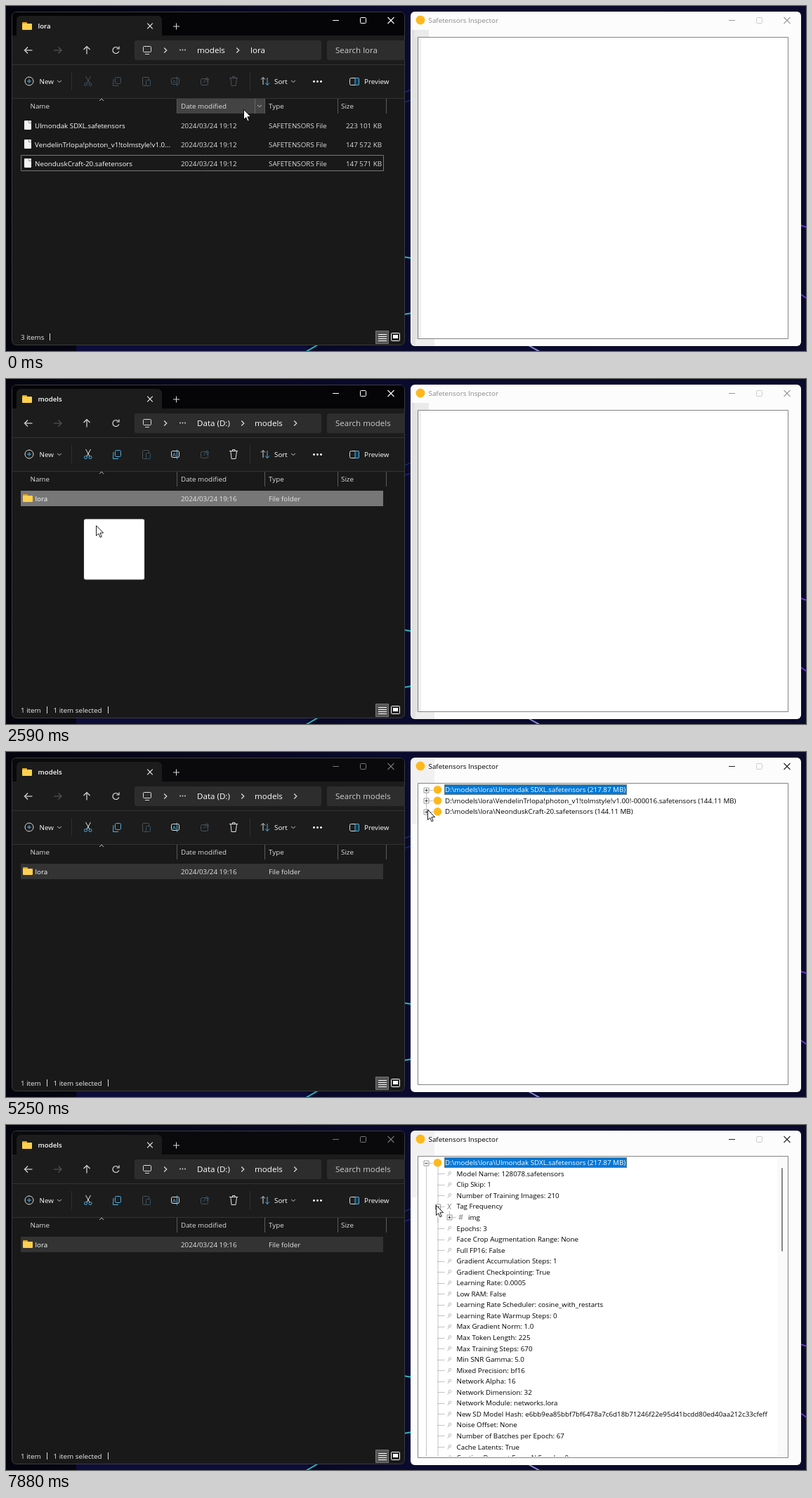
Recreate the animation shown at these times as an HTML page with a canvas. Size 1139x491 px, loop 8 s.

```html
<!DOCTYPE html>
<html lang="en">
<head>
<meta charset="utf-8">
<title>Safetensors Inspector</title>
<style>
html, body { margin: 0; height: 100%; overflow: hidden; background: #05050f; }
canvas { display: block; }
</style>
</head>
<body>
<canvas id="stage" width="1139" height="491"></canvas>
<script>
const g = document.getElementById('stage').getContext('2d');
const LOOP = 8000, ROW = 15.55, BLUE = '#4cb4e8', DIM = '#4b5258', YELLOW = '#ffb81c';

const files = [
  ['Ulmondak SDXL.safetensors', '223 101 KB', '217.87 MB'],
  ['VendelinTrlopa!photon_v1!tolmstyle!v1.00!-000016.safetensors', '147 572 KB', '144.11 MB'],
  ['NeonduskCraft-20.safetensors', '147 571 KB', '144.11 MB']
];

// label | value of the first file | value of the third file
const meta = `Model Name|128078.safetensors|sd-v1-5-pruned-noema-fp16.safetensors
Clip Skip|1|2
Number of Training Images|210|336
Tag Frequency
Epochs|3|20
Face Crop Augmentation Range|None|None
Full FP16|False|False
Gradient Accumulation Steps|1|1
Gradient Checkpointing|True|False
Learning Rate|0.0005|0.0001
Low RAM|False|True
Learning Rate Scheduler|cosine_with_restarts|cosine_with_restarts
Learning Rate Warmup Steps|0|168
Max Gradient Norm|1.0|1.0
Max Token Length|225|225
Max Training Steps|670|3360
Min SNR Gamma|5.0|5.0
Mixed Precision|bf16|fp16
Network Alpha|16|128
Network Dimension|32|128
Network Module|networks.lora|networks.lora
New SD Model Hash|e6bb9ea85bbf7bf6478a7c6d18b71246f22e95d41bcdd80ed40aa212c33cfeff|f8999e07ed43938dfcfc71498a761c79472999547b045100d201e376715cecfe
Noise Offset|None|None
Number of Batches per Epoch|67|168
Cache Latents|True|True
Caption Dropout Every N Epochs|0|0
Caption Dropout Rate|0.0|0.0`.split('\n').map(s => s.split('|'));

// pointer stops: time, x, y
const path = [
  [0, 338, 147], [590, 338, 147], [1300, 280, 70], [1410, 280, 70],
  [2200, 55, 169], [2450, 55, 169], [2590, 127, 208], [2740, 362, 290],
  [2800, 470, 297], [2860, 567, 285], [2950, 655, 235], [3090, 703, 197],
  [4390, 703, 197], [5130, 600, 82], [5430, 600, 82], [5690, 638, 116],
  [5800, 638, 116], [6040, 725, 166], [6250, 725, 166], [6520, 586, 58],
  [6690, 598, 52], [6880, 598, 52], [7220, 631, 119], [7450, 631, 119],
  [7630, 612, 114], [8000, 612, 114]
];

const same = (a, b) => a[1] === b[1] && a[2] === b[2];

function slope(i, k) {
  const a = path[i - 1], b = path[i], c = path[i + 1];
  return !a || !c || same(a, b) || same(b, c) ? 0 : (c[k] - a[k]) / (c[0] - a[0]);
}

function pointer(t) {
  let i = 0;
  while (i < path.length - 2 && path[i + 1][0] <= t) i++;
  const a = path[i], b = path[i + 1], d = b[0] - a[0], u = (t - a[0]) / d;
  return [1, 2].map(k =>
    a[k] + (b[k] - a[k]) * u * u * (3 - 2 * u) +
    d * u * (1 - u) * ((1 - u) * slope(i, k) - u * slope(i + 1, k)));
}

function box(x, y, w, h, color, r = 0, border) {
  g.beginPath();
  g.roundRect(x, y, w, h, r);
  if (color) { g.fillStyle = color; g.fill(); }
  if (border) { g.strokeStyle = border; g.lineWidth = 1; g.stroke(); }
}

function line(color, width, ...p) {
  g.beginPath();
  for (let i = 0; i < p.length; i += 2) g.lineTo(p[i], p[i + 1]);
  g.strokeStyle = color;
  g.lineWidth = width;
  g.stroke();
}

function dot(x, y, r, color, outline) {
  g.beginPath();
  g.arc(x, y, r, 0, 7);
  if (outline) { g.strokeStyle = color; g.lineWidth = outline; g.stroke(); }
  else { g.fillStyle = color; g.fill(); }
}

function text(s, x, y, color = '#fff', size = 9.8, weight = 400, align = 'left') {
  g.font = `${weight} ${size}px "Open Sans", "Noto Sans", sans-serif`;
  g.textAlign = align;
  g.fillStyle = color;
  g.fillText(s, x, Math.round(y + size * .36));
}

const cross = (x, y, r, c) => {
  line(c, 1.1, x - r, y - r, x + r, y + r);
  line(c, 1.1, x - r, y + r, x + r, y - r);
};
const plus = (x, y, r, c) => {
  line(c, 1, x - r, y, x + r, y);
  line(c, 1, x, y - r, x, y + r);
};
const chevron = (x, y, c = '#ddd') => line(c, 1.2, x - 1.8, y - 3.5, x + 1.8, y, x - 1.8, y + 3.5);
const caret = (x, y, h, c = '#bbb') => line(c, 1, x - 3, y, x, y + h, x + 3, y);

function folder(x, y) {
  box(x, y, 7, 5, '#e8a417', 1);
  box(x, y + 2, 14, 9, '#ffd04f', 1);
}

function controls(x, color, mid) {
  line(color, 1, x - 4, 20.5, x + 5, 20.5);
  box(x + 35.5, 16.5, 8, 8, null, 1, mid);
  cross(x + 79, 20.5, 4.5, color);
}

function desktop() {
  const bg = g.createLinearGradient(0, 0, 1139, 0);
  bg.addColorStop(0, '#04040e');
  bg.addColorStop(.5, '#0a0a2e');
  bg.addColorStop(1, '#0a0a2a');
  g.fillStyle = bg;
  g.fillRect(0, 0, 1139, 491);
  box(100, 482, 330, 9, '#0d0d3a');
  line('#1b3f9c', 1, 567, 123, 577, 119);
  line('#1b3f9c', 1, 567, 137, 577, 134);
  line('#2bb5bd', 2, 566, 357, 578, 359);
  line('#2bb5bd', 2, 566, 439, 578, 437);
  line('#2bb5bd', 2, 427, 492, 446, 481);
  line('#8d8de0', 2, 742, 482, 760, 492);
  line('#6a35d8', 2, 1131, 312, 1140, 315);
  line('#6a35d8', 2, 1131, 410, 1140, 416);
}

function toolbar(on) {
  const w = on ? '#e4e4e4' : DIM, b = on ? BLUE : '#35556a';
  dot(33, 107, 6, '#ddd', 1);
  plus(33, 107, 3, BLUE);
  text('New', 47.5, 107.5);
  caret(76, 106, 2.5);
  line('#303030', 1, 93.5, 94, 93.5, 120);

  line(w, 1, 113.5, 100, 119, 110);
  line(w, 1, 120.5, 100, 115, 110);
  dot(113.5, 111.5, 2, b, 1);
  dot(120, 111.5, 2, b, 1);
  box(155.5, 101.5, 8, 9, null, 2, b);
  line(b, 1, 153, 104, 152.5, 113.5, 160, 113.5);
  box(194.5, 101.5, 9, 12, null, 1, DIM);
  box(199.5, 105.5, 6, 8, '#1c1c1c', 1, '#35556a');
  box(235.5, 102.5, 11, 9, null, 2, w);
  line(b, 1, 243.5, 100.5, 243.5, 114);
  text('A', 237, 107, b, 8);
  box(277.5, 103.5, 10, 9, null, 2, DIM);
  line('#35556a', 1, 281, 109, 284, 104.5, 288, 104.5);
  line('#35556a', 1, 285, 101, 289, 104.5, 285, 108);
  line(w, 1, 318, 102.5, 330, 102.5);
  line(w, 1, 320, 103, 321, 113.5, 327, 113.5, 328.5, 103);
  line(w, 1, 322.5, 102, 322.5, 100.5, 326, 100.5, 326, 102);
  line('#303030', 1, 347.5, 94, 347.5, 120);

  line('#ddd', 1, 363, 104.5, 366, 101.5, 369, 104.5);
  line('#ddd', 1, 366, 102, 366, 112);
  line(BLUE, 1, 372, 102, 372, 112.5);
  line(BLUE, 1, 369, 109.5, 372, 112.5, 375, 109.5);
  text('Sort', 382, 107.5);
  caret(409, 106, 2.5);
  for (const x of [438.5, 443.5, 448.5]) dot(x, 107.5, 1.4, '#fff');
  box(489.5, 102.5, 13, 10, null, 2, '#ddd');
  box(497, 102.5, 5.5, 10, '#16384a', 1, BLUE);
  text('Preview', 510, 107.5);
}

function addressBar(up, chip) {
  box(183, 49, 266, 28, '#2d2d2d', 3);
  box(457, 49, 111, 28, '#2d2d2d', [3, 0, 0, 3]);
  if (chip) box(265, 53, 75, 20, '#383838', 2);
  line('#ddd', 1.2, 37.5, 63, 27, 63);
  line('#ddd', 1.2, 31, 58.5, 26.5, 63, 31, 67.5);
  line('#555', 1.2, 68, 63, 78.5, 63);
  line('#555', 1.2, 74.5, 58.5, 79, 63, 74.5, 67.5);
  line('#ddd', 1.2, 115, 58, 115, 68.5);
  line('#ddd', 1.2, 110.5, 62, 115, 57.5, 119.5, 62);
  g.beginPath();
  g.arc(156.5, 63, 4.5, .3, 5.6);
  g.strokeStyle = '#ddd';
  g.stroke();
  line('#ddd', 1.2, 161, 57.5, 161, 61, 157.5, 61);
  box(195.5, 57.5, 11, 8, null, 1, '#ddd');
  line('#ddd', 1, 198, 68.5, 204, 68.5);
  chevron(227, 63);
  for (const x of [248, 251.5, 255]) dot(x, 62.5, .9, '#ddd');
  const [a, b, x1, x2] = up ? ['Data (D:)', 'models', 337, 354] : ['models', 'lora', 330, 348];
  text(a, 272, 63, '#fff', 11.6);
  chevron(x1, 63);
  text(b, x2, 63, '#fff', 11.6);
  if (up) chevron(412, 63);
  text(up ? 'Search models' : 'Search lora', 469, 63, '#ccc', 11.5);
}

function explorer(t, mx, my) {
  const up = t >= 1410, loading = t >= 1290 && t < 1350, inside = t < 1290;
  const active = t < 5250;
  box(8.5, 8.5, 559, 474, '#191919', 6, '#3b3b3b');
  box(9, 9, 558, 33, active ? '#050507' : '#0a0a0c', [5, 5, 0, 0]);
  box(15, 14, 207, 28, '#1c1c1c', [6, 6, 0, 0]);
  box(9, 42, 558, 41, '#1c1c1c');
  folder(23, 23);
  text(up ? 'models' : 'lora', 45.5, 29, '#fff', 9.7, 600);
  cross(205, 28.5, 3.8, '#eee');
  plus(242.5, 29, 4.5, '#ddd');
  controls(469, active ? '#fff' : '#777', active ? '#fff' : '#777');
  addressBar(up, mx > 265 && mx < 340 && my > 50 && my < 77);
  box(9, 84, 558, 47, '#1c1c1c');
  line('#333', 1, 9, 83.5, 567, 83.5);
  line('#333', 1, 9, 131.5, 567, 131.5);
  toolbar(t >= 1350);

  if (mx > 243 && mx < 368 && my > 131 && my < 153) {
    box(244, 132, 124, 21, '#434343');
    line('#666', 1, 354.5, 132, 354.5, 153);
    caret(361, 141, 2.5);
  }
  caret(136, 135, -3);
  for (const x of [243.5, 368.5, 472.5, 541.5]) line('#5a5a5a', 1, x, 132, x, 153);
  text('Name', 34.5, 142.5, '#ddd');
  text('Date modified', 249, 142.5, '#ddd');
  text('Type', 374, 142.5, '#ddd');
  text('Size', 477, 142.5, '#ddd');

  if (inside) {
    files.forEach(([name, size], i) => {
      const y = 170 + i * 27;
      box(26, y - 7, 10, 13, '#f4f4f4', 1);
      line('#999', 1, 32.5, y - 7, 32.5, y - 3.5, 36, y - 3.5);
      text(i === 1 ? name.slice(0, 39) + '...' : name, 41, y);
      text('2024/03/24 19:12', 249, y, '#ddd');
      text('SAFETENSORS File', 374, y, '#ddd');
      text(size, 535, y, '#ddd', 9.8, 400, 'right');
    });
    box(21.5, 212.5, 516, 22, null, 0, '#777');
  } else if (loading) {
    text('Working on it...', 288, 173, '#fff', 9.8, 400, 'center');
  } else {
    box(21, 159, 516, 22, active ? '#777' : '#333');
    folder(24, 164);
    text('lora', 41.5, 170);
    text('2024/03/24 19:16', 249, 170, '#e4e4e4');
    text('File folder', 374, 170, '#e4e4e4');
  }

  const one = t >= 1350;
  text(one ? '1 item' : loading ? '0 items' : '3 items', 21, 471.5, '#eee');
  const bar = x => line('#ddd', 1, x, 466, x, 476);
  bar(one ? 58.5 : 62.5);
  if (one) {
    text('1 item selected', 67.5, 471.5, '#eee');
    bar(145.5);
  }
  box(526.5, 462.5, 18, 18, '#555', 0, '#777');
  for (const y of [467.5, 470.5, 473.5, 476.5]) line('#fff', 1, 530, y, 542, y);
  box(548.5, 465.5, 12, 11, '#222', 1, '#fff');
  box(551, 468, 7, 5, '#fff');
}

function treeRows(t) {
  const rows = [];
  files.forEach(([name, , size], i) => {
    const open = i === 0 ? t >= 6850 : i === 2 && t >= 5280;
    rows.push({ depth: 0, label: `D:\\models\\lora\\${name} (${size})`, open, branch: true, chosen: i === 0 && t >= 5250 });
    if (!open) return;
    for (const m of meta) {
      const branch = m.length === 1, tagOpen = branch && i === 0 && t >= 7880;
      rows.push({ depth: 1, label: branch ? m[0] : `${m[0]}: ${m[i === 0 ? 1 : 2]}`, branch, open: tagOpen });
      if (tagOpen) rows.push({ depth: 2, label: 'img', branch: true });
    }
  });
  return rows;
}

function highlight(label, y) {
  g.font = '400 9.8px "Open Sans", "Noto Sans", sans-serif';
  const w = Math.round(g.measureText(label).width) + 3, top = Math.round(y - 7.7);
  box(624, top, w, 15, '#0078d7');
  g.setLineDash([1, 1]);
  box(624.5, top + .5, w - 1, 14, null, 0, '#e08a30');
  g.setLineDash([]);
}

function tree(t) {
  const rows = treeRows(t), scroll = t >= 5280 && t < 5900 ? 2 : 0;
  const rowY = i => 53.7 + (i - scroll) * ROW;
  const lastRoot = rows.findLastIndex(r => !r.depth);
  g.save();
  g.beginPath();
  g.rect(587, 45, 526, 427);
  g.clip();
  g.setLineDash([1, 1]);
  line('#888', 1, 598.5, rowY(0), 598.5, rowY(lastRoot));
  rows.forEach((r, i) => {
    const y = Math.round(rowY(i)) + .5, x = 598.5 + r.depth * 16.5;
    line('#888', 1, x, y, x + 10, y);
    if (r.depth) line('#888', 1, x, y, x, y - ROW + (r.depth > 1 ? 7 : 0));
    if (r.depth > 1) line('#888', 1, 615, y + 7, 615, y - 8);
  });
  g.setLineDash([]);
  rows.forEach((r, i) => {
    const y = rowY(i), x = 598.5 + r.depth * 16.5, ix = x + 16, tx = x + 27;
    if (r.branch) {
      const py = Math.round(y) + .5;
      box(x - 3.5, py - 3.5, 7, 7, '#fff', 0, '#999');
      line('#345', 1, x - 2, py, x + 2, py);
      if (!r.open) line('#345', 1, x, py - 2, x, py + 2);
    }
    if (!r.depth) dot(ix, y, 5.8, YELLOW);
    else if (r.depth > 1) text('#', ix - 3.5, y, '#777', 11);
    else if (r.branch) {
      line('#888', 1, ix - 2.5, y + 4, ix + 3, y - 4);
      line('#888', 1, ix - 2, y - 4, ix + 2, y + 4);
    } else {
      dot(ix + 1, y - 1, 1.8, '#aaa', .8);
      line('#aaa', .8, ix - .5, y, ix - 2, y + 3.5);
    }
    if (r.chosen) highlight(r.label, y);
    text(r.label, tx - .5, y, r.chosen ? '#fff' : '#000');
  });
  if (t >= 5280) {
    box(1098, 45, 15, 427, '#fafafa');
    box(1104, scroll ? 78 : 61, 2, t >= 6850 ? 119 : 232, '#858585', 1);
  }
  g.restore();
}

function inspector(t) {
  const active = t >= 5250;
  box(576, 8, 556, 476, '#fcfcfc', 6);
  if (active) box(577, 9, 33, 94, '#f1f1f1', [5, 0, 0, 0]);
  else {
    box(577, 34, 14, 449, '#e2e2e2', [0, 0, 0, 5]);
    box(582, 34, 20, 10, '#eaeaea');
    box(583, 474, 27, 10, '#ededed');
  }
  dot(590, 20, 6.5, YELLOW);
  text('Safetensors Inspector', 601.5, 20.5, active ? '#000' : '#888');
  controls(1033, active ? '#222' : '#999', '#ccc');
  box(586.5, 44.5, 527, 429, '#fff', 0, '#838383');
  if (!active) box(587, 45, 4, 428, '#efefef');
  if (t >= 3550) tree(t);
}

function tooltip(x, y) {
  g.save();
  g.shadowColor = 'rgba(0,0,0,.35)';
  g.shadowBlur = 3;
  g.shadowOffsetX = g.shadowOffsetY = 1.5;
  box(x, y, 89, 16, '#fff', 2);
  g.restore();
  box(x + .5, y + .5, 88, 15, null, 2, '#ccc');
  text('ss_tag_frequency', x + 5, y + 8, '#666');
}

function arrow(x, y) {
  const p = [0, 0, 0, 14.3, 3.2, 11.3, 5.5, 16.6, 7.7, 15.6, 5.4, 10.5, 10, 10.3];
  g.beginPath();
  for (let i = 0; i < p.length; i += 2) g.lineTo(x + p[i] + .5, y + p[i + 1] + .3);
  g.closePath();
  g.fillStyle = '#fff';
  g.fill();
  g.strokeStyle = '#000';
  g.lineWidth = .9;
  g.stroke();
}

function draw(t) {
  const [mx, my] = pointer(t);
  desktop();
  explorer(t, mx, my);
  inspector(t);
  if (t >= 2470 && t < 2900) {
    const u = Math.min(1, Math.max(0, (t - 2590) / 270));
    box(mx - 17.5 - 2 * u, my - 9.5 + 8 * u, 87, 87, '#fff', 3, '#222');
  }
  if (t >= 5760 && t < 5860) tooltip(634, 124);
  if (t >= 7420 && t < 7540) tooltip(626, 127);
  if (t >= 3400 && t < 3610) {
    dot(703.5, 204, 7.8, '#1b8ae0', 3.5);
    return;
  }
  arrow(mx, my);
  if (t >= 2900 && t < 3400) {
    box(mx + 7.5, my + 17.5, 9, 9, '#fff', 0, '#444');
    plus(mx + 12, my + 22, 2.5, '#222');
  }
}

function tick(now) {
  draw(now % LOOP);
  requestAnimationFrame(tick);
}
requestAnimationFrame(tick);
</script>
</body>
</html>
```
